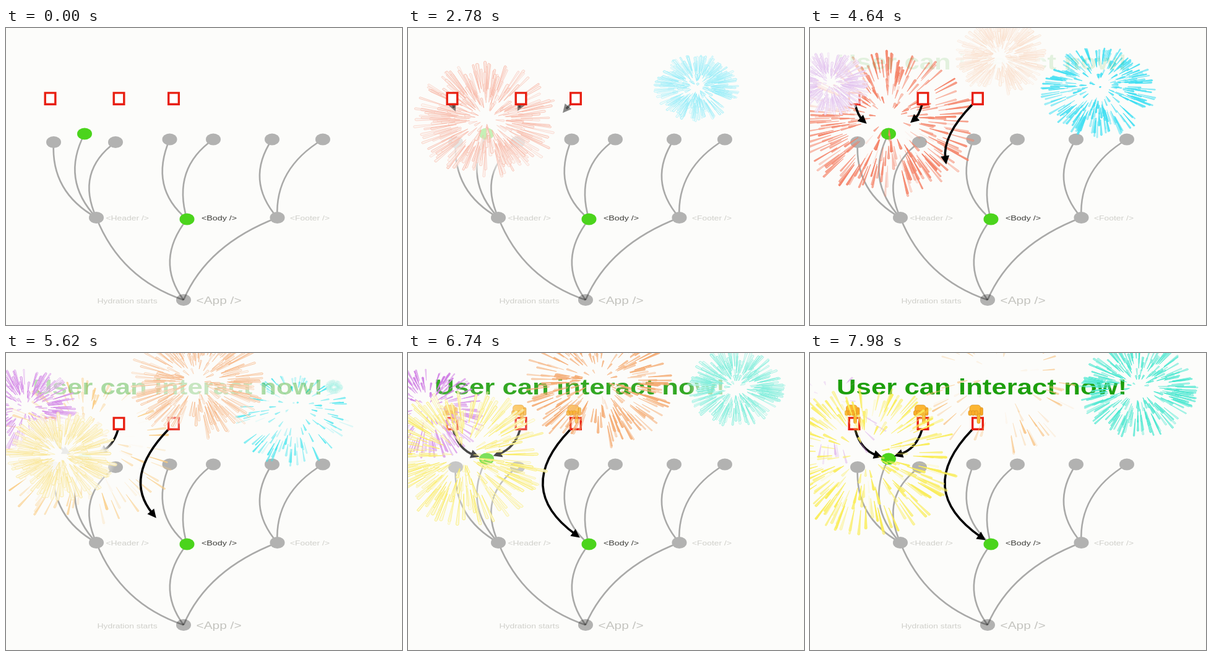
Write an HTML page with a canvas that moves like this. It is 640 by 480 pixels and loops after 8 s.

```html
<!DOCTYPE html>
<html lang="en">
<head>
<meta charset="utf-8">
<title>Hydration tree</title>
<style>
  html, body { margin: 0; width: 100%; height: 100%; overflow: hidden; background: #fcfcfa; }
  canvas { display: block; width: 100vw; height: 100vh; }
</style>
</head>
<body>
<canvas id="stage" width="640" height="480"></canvas>
<script>
const ctx = document.getElementById('stage').getContext('2d');
const LOOP = 8000;
const ASPECT = 1.25; // the whole scene is wider than tall by this factor
const PAPER = [252, 252, 250], GRAY = '#b2b2b1', GREEN = '#4bd41c', RED = '#e81e10';
const FONT = '"Liberation Sans", Arial, sans-serif';

const clamp = v => Math.max(0, Math.min(1, v));
const lerp = (a, b, k) => a + (b - a) * k;
const mix = (p, q, k) => p.map((v, i) => lerp(v, q[i], k));
const rgb = (c, alpha = 1) => `rgba(${c.map(Math.round).join()},${alpha})`;

function seeded(seed) {
  return () => {
    seed = (seed + 0x6D2B79F5) | 0;
    let h = Math.imul(seed ^ (seed >>> 15), 1 | seed);
    h = (h + Math.imul(h ^ (h >>> 7), 61 | h)) ^ h;
    return ((h ^ (h >>> 14)) >>> 0) / 4294967296;
  };
}

const app = [287, 439.5], header = [146, 306.5], body = [292.5, 309], footer = [438.5, 306.5];
// child, parent, control point of the branch
const branches = [
  [header, app, [185, 405]], [body, app, [240, 376]], [footer, app, [325, 350]],
  [[77, 184.5], header, [72, 265]], [[127, 171], header, [88, 245]], [[177, 184.5], header, [112, 232]],
  [[264.5, 180], body, [231, 258]], [[335, 180], body, [268, 227]],
  [[430, 180], footer, [386, 246]], [[512, 180], footer, [434, 227]]
];
const greenNodes = [body, branches[4][0]];
const boxes = [71.5, 182.5, 271];
// start, control, end, share of the length present at once
const arrows = [
  [[73, 124], [82, 157], [116, 168], .1],
  [[181, 124], [172, 155], [137, 166.5], .1],
  [[262, 124], [167, 222], [283, 302], 0]
];

function label(text, x, y, size, color, weight = '') {
  ctx.save();
  ctx.translate(x, y);
  ctx.scale(ASPECT, 1);
  ctx.font = `${weight} ${size}px ${FONT}`;
  ctx.fillStyle = color;
  ctx.fillText(text, 0, 0);
  ctx.restore();
}

function node([x, y], color) {
  ctx.fillStyle = color;
  ctx.beginPath();
  ctx.ellipse(x, y, 12, 9.6, 0, 0, 7);
  ctx.fill();
}

function drawTree() {
  node(app, GRAY);
  ctx.strokeStyle = 'rgba(0,0,0,.33)';
  ctx.lineWidth = 2.6;
  for (const [child, parent, c] of branches) {
    ctx.beginPath();
    ctx.moveTo(...child);
    ctx.quadraticCurveTo(...c, ...parent);
    ctx.stroke();
  }
  for (const [child] of branches) node(child, greenNodes.includes(child) ? GREEN : GRAY);
  const pale = '#cfcfca';
  label('<Header />', 161.5, 311, 11.1, pale);
  label('<Body />', 316, 311, 11.4, '#3c3c38');
  label('<Footer />', 459, 311, 11.1, pale);
  label('Hydration starts', 147.5, 445, 11.1, pale);
  label('<App />', 307.5, 446, 16.7, '#c4c4bf');
}

function drawBox(x) {
  ctx.fillStyle = '#fff';
  ctx.strokeStyle = RED;
  ctx.lineWidth = 3.4;
  ctx.beginPath();
  ctx.rect(x - 8.3, 104.9, 16.6, 18.4);
  ctx.fill();
  ctx.stroke();
}

function drawArrow([start, control, end, base], grow) {
  const k = base + (1 - base) * grow;
  const c = mix(start, control, k), tip = mix(c, mix(control, end, k), k);
  const angle = Math.atan2(tip[1] - c[1], tip[0] - c[0]);
  ctx.strokeStyle = ctx.fillStyle = '#000';
  ctx.lineWidth = 3.6;
  ctx.beginPath();
  ctx.moveTo(...start);
  ctx.quadraticCurveTo(...c, tip[0] - 8 * Math.cos(angle), tip[1] - 8 * Math.sin(angle));
  ctx.stroke();
  ctx.save();
  ctx.translate(...tip);
  ctx.rotate(angle);
  ctx.beginPath();
  ctx.moveTo(1, 0);
  ctx.lineTo(-13, -7);
  ctx.lineTo(-13, 7);
  ctx.fill();
  ctx.restore();
}

function drawHand(x) {
  ctx.save();
  ctx.translate(x, 114);
  ctx.strokeStyle = '#d08a20';
  ctx.lineWidth = .6;
  const part = (px, py, w, h, r, color = '#fcb632') => {
    ctx.fillStyle = color;
    ctx.beginPath();
    ctx.roundRect(px, py, w, h, r);
    ctx.fill();
    ctx.stroke();
  };
  part(-1, -20, 5, 20, 2.5);
  part(-13, -30, 18, 15, 5);
  part(4, -26, 4.5, 13, 2.2, '#f7a823');
  for (const px of [-15, -10, -5]) part(px, -21, 5.5, 8, 2.6, '#f9ad2a');
  ctx.restore();
}

// colors at young, mid and old age
const CORAL = [[250, 205, 190], [243, 116, 92], [250, 205, 130]];
const CYAN = [[170, 240, 250], [56, 222, 242], [70, 230, 238]];
const VIOLET = [[230, 206, 240], [206, 118, 228], [210, 150, 230]];
const GOLD = [[250, 224, 206], [244, 165, 104], [248, 190, 120]];
const LEMON = [[250, 230, 150], [250, 236, 84], [250, 238, 90]];
const MINT = [[150, 240, 225], [60, 230, 205], [50, 232, 195]];

function makeBurst(x, y, radius, start, colors, count, width, speed = 1.2) {
  const rnd = seeded(x * 31 + y);
  const sparks = Array.from({ length: count }, () => {
    const rho = .08 + .92 * rnd() ** .45;
    return {
      rho, angle: rnd() * 2 * Math.PI, life: 2.8 + .4 * rho + 1.4 * rnd(),
      size: width * (.7 + .6 * rnd()), strength: .4 + .6 * rnd()
    };
  });
  return { x, y, radius, start, colors, speed, sparks };
}

const backBursts = [
  makeBurst(127, 147, 152, 1650, CORAL, 260, 1.9, 1.3),
  makeBurst(467, 95, 96, 1750, CYAN, 260, 1.5)
];
const frontBursts = [
  makeBurst(32, 89, 96, 3700, VIOLET, 220, 1.4),
  makeBurst(308, 46, 130, 3900, GOLD, 240, 1.7),
  makeBurst(90, 165, 155, 4900, LEMON, 230, 2.1),
  makeBurst(530, 55, 102, 5510, MINT, 260, 1.5)
];

function drawBurst(burst, t) {
  const age = (t - burst.start) / 1000;
  if (age <= 0 || age > 5) return;
  const R = burst.radius / ASPECT * (1 - Math.exp(-burst.speed * age));
  const [young, mid, old] = burst.colors;
  const color = mix(mix(young, mid, clamp((age - .8) / 1.3)), old, clamp((age - 2.9) / 1.1));
  const core = mix(mix(color, PAPER, .78), color, clamp((age - 2) / 1.2));

  ctx.save();
  ctx.translate(burst.x, burst.y);
  ctx.scale(ASPECT, 1);

  const glow = ctx.createRadialGradient(0, 0, 0, 0, 0, R);
  glow.addColorStop(.75, rgb(PAPER));
  glow.addColorStop(1, rgb(PAPER, 0));
  ctx.globalAlpha = clamp(1.35 - .58 * age);
  ctx.fillStyle = glow;
  ctx.beginPath();
  ctx.arc(0, 0, R, 0, 7);
  ctx.fill();

  ctx.fillStyle = rgb(core);
  ctx.strokeStyle = rgb(color);
  ctx.lineWidth = .8;
  const tail = Math.min(.82, .46 + .08 * age), drop = .9 * age * age;
  const thin = lerp(1, .65, clamp(age / 2.5));
  for (const { rho, angle, life, size, strength } of burst.sparks) {
    const alpha = strength * clamp(age / .6) * clamp((life - age) / .5);
    if (!alpha) continue;
    ctx.globalAlpha = alpha;
    const head = R * rho;
    const hx = head * Math.cos(angle), hy = head * Math.sin(angle) + drop;
    const tx = hx * tail, ty = head * tail * Math.sin(angle) + drop * .6;
    const a = Math.atan2(hy - ty, hx - tx);
    ctx.beginPath();
    ctx.moveTo(tx, ty);
    ctx.arc(hx, hy, size * thin, a - Math.PI / 2, a + Math.PI / 2);
    ctx.closePath();
    ctx.fill();
    ctx.stroke();
  }
  ctx.restore();
}

function faded(alpha, draw) {
  if (alpha <= 0) return;
  ctx.globalAlpha = alpha;
  draw();
  ctx.globalAlpha = 1;
}

function render(t) {
  ctx.fillStyle = rgb(PAPER);
  ctx.fillRect(0, 0, 640, 480);
  drawTree();
  backBursts.forEach(b => drawBurst(b, t));

  const grow = (1 - Math.cos(Math.PI * clamp((t - 1900) / 5400))) / 2;
  faded(clamp((t - 1900) / 1900), () => arrows.forEach(a => drawArrow(a, grow)));
  boxes.forEach(drawBox);
  faded(clamp((t - 3000) / 3900) ** 2.5, () => label('User can interact now!', 43, 66.5, 35, '#1d9f0c', 'bold'));
  faded(clamp((t - 5700) / 1400), () => boxes.forEach(drawHand));

  frontBursts.forEach(b => drawBurst(b, t));
}

function tick() {
  render(performance.now() % LOOP);
  requestAnimationFrame(tick);
}
tick();
</script>
</body>
</html>
```
